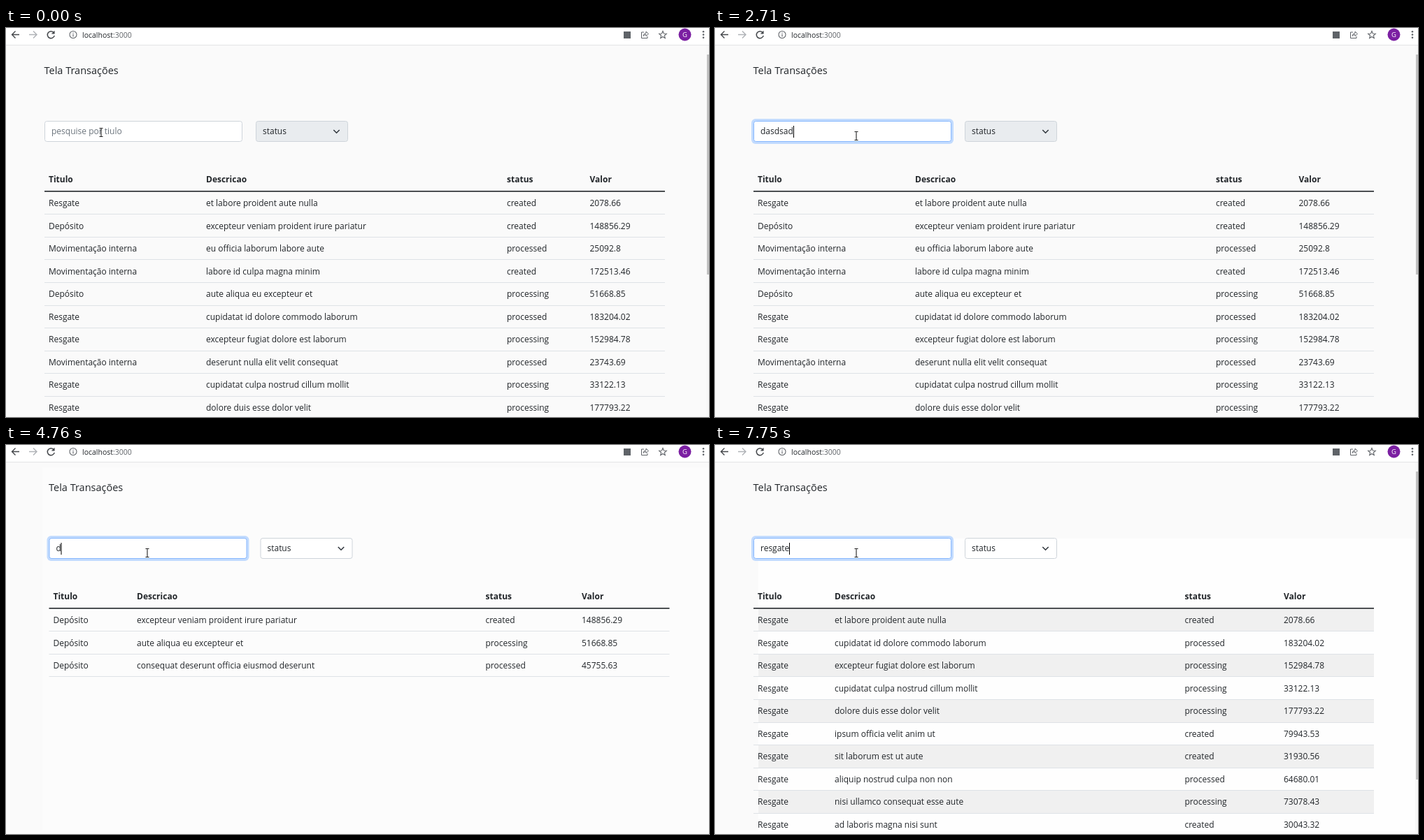
These frames come from a looping animation (1005 by 557 pixels, 8000 ms). An HTML page with a canvas:

```html
<!DOCTYPE html>
<html lang="pt">
<head>
<meta charset="utf-8">
<title>Tela Transações</title>
<style>
  html, body { margin: 0; width: 100%; height: 100%; overflow: hidden; background: #fafafa; }
  canvas { display: block; }
</style>
</head>
<body>
<canvas id="stage" width="1005" height="557"></canvas>
<script>
const c = document.getElementById('stage').getContext('2d', { alpha: false });
const LOOP = 8000, INK = '#212529', MUTED = '#6c757d', BORDER = '#ced4da', PAGE = '#fafafa';
const FONT = '"Open Sans", "Noto Sans", sans-serif';

const transactions = `Resgate|et labore proident aute nulla|created|2078.66
Depósito|excepteur veniam proident irure pariatur|created|148856.29
Movimentação interna|eu officia laborum labore aute|processed|25092.8
Movimentação interna|labore id culpa magna minim|created|172513.46
Depósito|aute aliqua eu excepteur et|processing|51668.85
Resgate|cupidatat id dolore commodo laborum|processed|183204.02
Resgate|excepteur fugiat dolore est laborum|processing|152984.78
Movimentação interna|deserunt nulla elit velit consequat|processed|23743.69
Resgate|cupidatat culpa nostrud cillum mollit|processing|33122.13
Resgate|dolore duis esse dolor velit|processing|177793.22
Resgate|ipsum officia velit anim ut|created|79943.53
Resgate|sit laborum est ut aute|created|31930.56
Resgate|aliquip nostrud culpa non non|processed|64680.01
Resgate|nisi ullamco consequat esse aute|processing|73078.43
Resgate|ad laboris magna nisi sunt|created|30043.32
Depósito|consequat deserunt officia eiusmod deserunt|processed|45755.63`
  .split('\n').map(row => row.split('|'));

const layouts = {
  all: { columns: [61, 286, 716, 834.5], shift: 0, thumb: 353 },
  d: { columns: [61, 180.5, 679, 816.5], shift: 6.5 },
  r: { columns: [61, 171, 671.5, 813], shift: 0, thumb: 479 }
};

// Typing: [time, length of the phrase, caret visible]
const MASHED = 'dasdsadasdsadas', WORD = 'resgate';
const typing = [
  [0, 0, 0], [540, 0, 1], [1100, 0, 0], [1610, 0, 1], [1890, 1, 1], [2180, 3, 1],
  [2450, 4, 1], [2580, 6, 1], [2710, 7, 1], [2840, 9, 1],
  [3100, 10, 1], [3230, 12, 1], [3360, 13, 1], [3490, 15, 1], [3870, 14, 1], [4130, 14, 0],
  [4380, 11, 1], [4510, 7, 1], [4640, 3, 1], [4760, 1, 1], [4900, 0, 1],
  [5160, 0, 0], [5660, 0, 1], [6210, 2, 1], [6460, 3, 1], [6590, 4, 1],
  [6730, 5, 1], [7240, 6, 1], [7750, 7, 1]
];
// Pointer: [time, x, y]
const pointer = [
  [0, 136, 149], [130, 145, 152], [260, 160, 154], [390, 171, 155], [540, 181, 140],
  [700, 185, 138], [830, 192, 136], [970, 230, 149], [1100, 235, 144], [1480, 215, 140],
  [1610, 182, 140], [1750, 167, 152], [1890, 190, 156], [2020, 201, 156], [2450, 202, 154]
];
const at = (track, t) => track.findLast(key => key[0] <= t);

function text(str, x, y, size = 12, color = INK, weight = 400) {
  c.font = `${weight} ${size}px ${FONT}`;
  c.fillStyle = color;
  c.fillText(str, x, y);
}
function rect(x, y, w, h, color) {
  c.fillStyle = color;
  c.fillRect(x, y, w, h);
}
function path(d, color, width = 1.4, fill) {
  const shape = new Path2D(d);
  if (fill) { c.fillStyle = fill; c.fill(shape); }
  c.strokeStyle = color;
  c.lineWidth = width;
  c.stroke(shape);
}
function dot(x, y, r, color) {
  c.fillStyle = color;
  c.beginPath();
  c.arc(x, y, r, 0, 7);
  c.fill();
}
function box(x, y, w, h, r, fill, stroke) {
  c.beginPath();
  c.roundRect(x, y, w, h, r);
  if (fill) { c.fillStyle = fill; c.fill(); }
  if (stroke) { c.strokeStyle = stroke; c.lineWidth = 1; c.stroke(); }
}

function toolbar() {
  const gray = '#5f6368';
  rect(0, 0, 1005, 24, '#fff');
  rect(0, 24, 1005, 1, '#e3e4e6');
  path('M19 9.5H9M13.5 4.5L8.5 9.5L13.5 14.5', '#45484c');
  path('M33 9.5H43M39 4.5L44 9.5L39 14.5', '#b0b3b7');
  path('M68 6.3A5 5 0 1 0 69.2 10.8', '#45484c', 1.5);
  path('M69.3 4.2V8.2H65.3Z', '#45484c', .5, '#45484c');
  path('M101 9.5A5 5 0 1 1 91 9.5A5 5 0 1 1 101 9.5M96 8.8V12.5M96 6.5V7.7', gray, 1.1);
  text('localhost', 109, 13.5, 10.5, INK);
  text(':3000', 109 + c.measureText('localhost').width, 13.5, 10.5, gray);
  rect(883, 5, 10, 10, gray);
  path('M912 6H908.5V14.5H917V12M911 11.5Q911.5 7.5 915 7.5V5L918.5 8.5L915 11.5V9.5Q912.5 9.5 911 11.5Z', gray, 1);
  path('M939 4.5L940.5 8L944.3 8.3L941.4 10.8L942.3 14.5L939 12.5L935.7 14.5L936.6 10.8L933.7 8.3L937.5 8Z', gray, 1.1);
  dot(970.5, 9.5, 9, '#7b1fa2');
  text('G', 967, 13, 9.5, '#fff');
  for (const y of [5.2, 9.5, 13.8]) dot(997, y, 1.3, gray);
}

function controls(t, query, caret, filtered) {
  const focus = t < 700 ? 0 : t < 830 ? .6 : 1;
  if (focus) {
    c.globalAlpha = focus;
    box(52, 130, 289, 36, 6, '#c2dbfe');
    c.globalAlpha = 1;
  }
  box(55.5, 133.5, 282, 29, 3, '#fff', focus ? '#86b7fe' : BORDER);
  text(query || 'pesquise por tiulo', 65, 152, 12, query ? INK : MUTED);
  if (caret) rect(Math.round(65 + (query ? c.measureText(query).width : 0)), 140, 1, 17, '#000');

  box(357.5, 133.5, 131, 29, 3, filtered ? '#fff' : '#e9ecef', BORDER);
  text('status', 367, 152);
  path('M468.3 146L472.5 150.2L476.7 146', '#343a40', 1.6);
}

function table(rows, columns, striped) {
  const line = i => Math.round(233.7 + 32.56 * i);
  const cells = (row, y, weight) => row.forEach((cell, i) => text(cell, columns[i], y, 12, INK, weight));
  cells(['Titulo', 'Descricao', 'status', 'Valor'], 221, 700);
  rows.forEach((row, i) => {
    if (striped && i % 2 === 0) rect(62, line(i) + 1, 880, line(i + 1) - line(i) - 1, '#f0f0f0');
    rect(55, line(i + 1), 887, 1, '#dee2e6');
    cells(row, Math.round(255 + 32.56 * i));
  });
  rect(55, 233, 887, 1.6, INK);
}

function draw(t) {
  const [, length, caret] = at(typing, t);
  const query = (t < 5000 ? MASHED : WORD).slice(0, length);
  const matches = query ? transactions.filter(row => row[0].toLowerCase().startsWith(query)) : [];
  const filtered = matches.length > 0;
  const layout = layouts[filtered ? query[0] : 'all'];
  const { columns, shift, thumb } = layout;

  rect(0, 0, 1005, 557, PAGE);
  if (layout === layouts.d) rect(52, 32, 953, 520, '#fcfcfc');
  if (layout === layouts.r) rect(62, 134, 939, 418, '#fefefe');
  toolbar();
  if (thumb) {
    rect(1001, 25, 4, 532, '#f7f7f7');
    rect(1002, 38, 3, thumb - 38, '#c1c1c1');
  }

  c.save();
  c.translate(shift, 0);
  text('Tela Transações', 54.5, 66, 14.5);
  controls(t, query, caret, filtered);
  table((filtered ? matches : transactions).slice(0, 10), columns, layout === layouts.r);
  c.restore();

  const [, x, y] = at(pointer, t);
  path(`M${x - 2.5} ${y - 5.5}h2l.5 .5l.5 -.5h2M${x} ${y - 5}v11M${x - 2.5} ${y + 6.5}h2l.5 -.5l.5 .5h2`, '#222', 1.1);
}

function tick(now) {
  draw(now % LOOP);
  requestAnimationFrame(tick);
}
requestAnimationFrame(tick);
</script>
</body>
</html>
```
